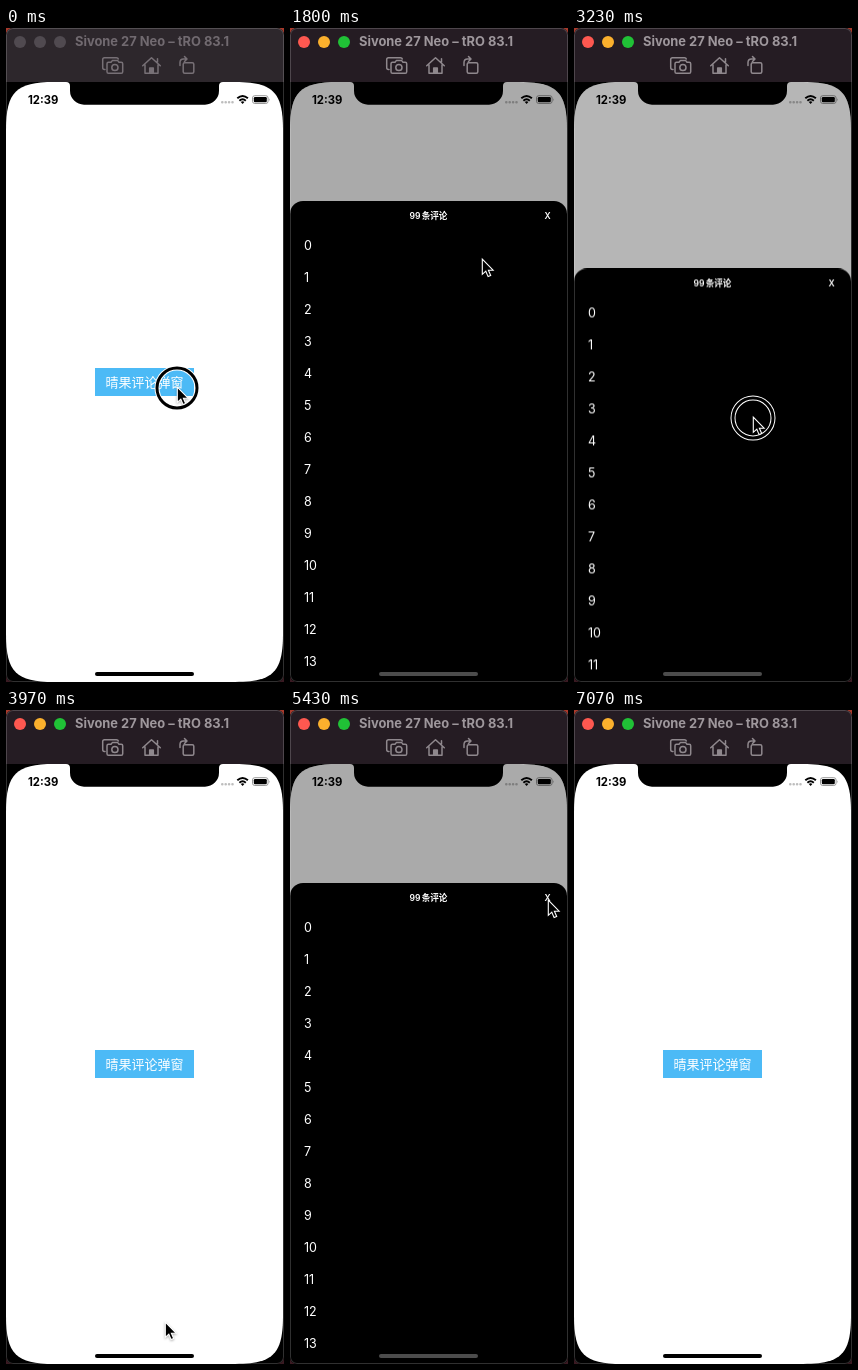
These frames come from a looping animation (278x654 px, 7230 ms). An HTML page:

```html
<!DOCTYPE html>
<html lang="zh-CN">
<head>
<meta charset="utf-8">
<title>评论弹窗</title>
<style>
:root { --loop: 7230ms; }
html, body { margin: 0; width: 100%; height: 100%; overflow: hidden; }
body {
  background: linear-gradient(#a83a2c, #3a1a22);
  font-family: Inter, "Noto Sans CJK SC", "Noto Sans CJK", sans-serif;
}
.stage { position: relative; width: 278px; height: 654px; overflow: hidden; background: #000; border-radius: 7px; }
.stage * { box-sizing: border-box; }
.stage div, .stage svg { position: absolute; }
.rim { inset: 0; border-radius: 7px; box-shadow: inset 0 0 0 1px rgba(255, 255, 255, .19); }

/* window bar */
.bar { left: 0; top: 0; width: 278px; height: 54px; animation: bar var(--loop) step-end infinite; }
.light { top: 8px; width: 12px; height: 12px; border-radius: 50%; animation: light var(--loop) step-end infinite; }
.name { left: 69px; top: 5px; font: 700 12.9px/17px Inter, sans-serif; white-space: nowrap; }
.icons { left: 0; top: 0; animation: icons var(--loop) step-end infinite; }
@keyframes bar {
  0% { color: #716a70; background: #2d272c; }
  .41%, 100% { color: #9e979c; background: #251c23; }
}
@keyframes light { 0% { background: #504a50; } .41%, 100% { background: var(--c); } }
@keyframes icons { 0% { color: #777076; } .41%, 100% { color: #8f888d; } }

/* phone screen, with continuous corners */
.screen {
  left: 0; top: 54px; width: 277px; height: 600px; background: #fff;
  clip-path: path("M0 48C0 10 10 0 48 0H229C267 0 277 10 277 48V552C277 590 267 600 229 600H48C10 600 0 590 0 552Z");
}
.button {
  left: 89px; top: 286px; width: 99px; height: 28px; background: #4cbaf6; color: #fff;
  font-size: 13px; line-height: 28px; text-align: center; white-space: nowrap;
}
.clock { left: 22px; top: 10px; font: 700 11.3px/16px Inter, sans-serif; color: #000; }
.dim { inset: 0; background: #000; animation: dim var(--loop) linear infinite; }

/* comment sheet */
.sheet {
  left: 0; top: 173px; width: 277px; height: 481px; background: #000; color: #fff;
  border-radius: 13px 13px 0 0; overflow: hidden;
  animation: sheet var(--loop) linear infinite;
}
.count, .close { top: 6.5px; font-size: 8.6px; font-weight: 600; line-height: 16px; }
.count { left: 0; width: 277px; text-align: center; word-spacing: -1px; }
.close { left: 254.5px; }
.view { left: 0; top: 28.6px; width: 277px; height: 453px; overflow: hidden; }
.list { left: 14px; top: 0; font-size: 12.5px; line-height: 32px; animation: list var(--loop) linear infinite; }
.list p { margin: 0; }
.home {
  left: 89px; top: 644px; width: 99px; height: 4px; border-radius: 2px;
  animation: home var(--loop) step-end infinite;
}

/* pointer */
.pointer { left: 0; top: 0; width: 0; height: 0; animation: move var(--loop) linear infinite; }
.pointer svg { left: -30px; top: -30px; }
.arrow { filter: drop-shadow(0 1px 1px rgba(0, 0, 0, .3)); }
.ring { animation: press var(--loop) step-end infinite; }

/* sheet eases out cubic; the dimming leads on opening and lags on closing */
@keyframes sheet {
  0% { transform: translateY(481px); }
  2.07% { transform: translateY(481px); animation-timing-function: cubic-bezier(.333, 1, .667, 1); }
  5.53%, 16.87% { transform: none; }
  19.64% { transform: translateY(45px); animation-timing-function: cubic-bezier(.333, 1, .667, 1); }
  22.13%, 40.94% { transform: none; }
  44.67%, 45.23% { transform: translateY(67.4px); }
  48.69% { transform: translateY(238px); animation-timing-function: cubic-bezier(.333, 1, .667, 1); }
  51.73% { transform: translateY(481px); }
  64.59% { transform: translateY(481px); animation-timing-function: cubic-bezier(.333, 1, .667, 1); }
  68.05% { transform: none; }
  79.63% { transform: none; animation-timing-function: cubic-bezier(.333, 1, .667, 1); }
  83.08%, 100% { transform: translateY(481px); }
}
@keyframes dim {
  0% { opacity: 0; }
  2.07% { opacity: 0; animation-timing-function: cubic-bezier(.165, .84, .44, 1); }
  5.53%, 16.87% { opacity: .333; }
  19.64% { opacity: .302; animation-timing-function: cubic-bezier(.333, 1, .667, 1); }
  22.13%, 40.94% { opacity: .333; }
  44.67%, 45.23% { opacity: .288; }
  48.69% { opacity: .168; animation-timing-function: cubic-bezier(.333, .667, .667, 1); }
  51.73% { opacity: 0; }
  64.59% { opacity: 0; animation-timing-function: cubic-bezier(.165, .84, .44, 1); }
  68.05% { opacity: .333; }
  79.63% { opacity: .333; animation-timing-function: cubic-bezier(.333, .667, .667, 1); }
  83.08%, 100% { opacity: 0; }
}
@keyframes list {
  0% { transform: none; }
  31.26% { transform: none; animation-timing-function: ease-in-out; }
  35.41% { transform: translateY(-90px); animation-timing-function: ease-in-out; }
  40.94%, 100% { transform: none; }
}
@keyframes home {
  0% { background: #000; }
  2.2% { background: #4c4c4c; }
  51.6% { background: #000; }
  64.7% { background: #4c4c4c; }
  83%, 100% { background: #000; }
}
@keyframes move {
  0% { transform: translate(171px, 359px); }
  13.42% { transform: translate(171px, 359px); animation-timing-function: ease-in-out; }
  16.6%, 16.87% { transform: translate(188px, 186px); }
  19.64% { transform: translate(192px, 231px); }
  25.86% { transform: translate(192px, 231px); animation-timing-function: ease-in-out; }
  30.43% { transform: translate(188px, 322px); }
  31.26% { transform: translate(188px, 322px); animation-timing-function: ease-in-out; }
  35.41% { transform: translate(186px, 232px); animation-timing-function: ease-in-out; }
  40.94% { transform: translate(182px, 322px); }
  44.67%, 45.23% { transform: translate(179px, 389px); }
  48.69% { transform: translate(162px, 560px); animation-timing-function: ease-out; }
  50.48% { transform: translate(159px, 612px); }
  55.33% { transform: translate(159px, 612px); animation-timing-function: ease-in-out; }
  62.24% { transform: translate(145px, 362px); }
  68.46% { transform: translate(145px, 362px); animation-timing-function: ease-in-out; }
  74.69% { transform: translate(258px, 190px); }
  81.6% { transform: translate(258px, 190px); animation-timing-function: ease-in-out; }
  86.72% { transform: translate(126px, 341px); visibility: visible; }
  96.54% { transform: translate(126px, 341px); visibility: visible; }
  97.64% { transform: translate(57px, 17px); visibility: visible; }
  97.65%, 100% { transform: translate(57px, 17px); visibility: hidden; }
}
@keyframes press {
  0% { opacity: 1; }
  1.4% { opacity: 0; }
  16.87% { opacity: 1; }
  19.64% { opacity: 0; }
  30.9% { opacity: 1; }
  48.69% { opacity: 0; }
  62.66% { opacity: 1; }
  64.18% { opacity: 0; }
  75.65% { opacity: 1; }
  77.03%, 100% { opacity: 0; }
}
</style>
</head>
<body>
<div class="stage">
  <div class="bar">
    <div class="light" style="left:8px;--c:#fe5850"></div>
    <div class="light" style="left:28px;--c:#fbb02d"></div>
    <div class="light" style="left:48px;--c:#20c136"></div>
    <div class="name">Sivone 27 Neo – tRO 83.1</div>
    <svg class="icons" width="278" height="54" fill="none" stroke="currentColor" stroke-width="1.5" stroke-linejoin="round" stroke-linecap="round">
      <path d="M99 41.5H98.5Q96.7 41.5 96.7 39.5V31.5Q96.7 29.7 98.5 29.7H110.5Q112 29.7 112.3 31"/>
      <path d="M102.5 34.2H105L106.3 32.6H111.7L113 34.2H115.2Q116.7 34.2 116.7 35.7V43.7Q116.7 45.3 115.2 45.3H102.5Q101 45.3 101 43.7V35.7Q101 34.2 102.5 34.2Z"/>
      <circle cx="108.9" cy="39.5" r="3.1"/>
      <path d="M136.7 37.7L145.5 29.7L154.3 37.7M139 36.5V45.3H152V36.5M151.5 34V30.7"/>
      <path d="M143.7 45V40H147.3V45Z" fill="currentColor"/>
      <rect x="177.2" y="34.7" width="10.6" height="10.6" rx="1.5"/>
      <path d="M174 37.5V34.5Q174 31 177.5 31H180.5M178.5 28.5L181 31L178.5 33.5"/>
    </svg>
  </div>

  <div class="screen">
    <div class="button">晴果评论弹窗</div>
    <div class="clock">12:39</div>
    <svg width="277" height="30">
      <path d="M60 0Q64 0 64 4V8.7A14 14 0 0 0 78 22.7H199A14 14 0 0 0 213 8.7V4Q213 0 217 0Z"/>
      <path d="M216.3 20.3H227" stroke="#bdbdbd" stroke-width="2.6" stroke-linecap="round" stroke-dasharray="0 3.4"/>
      <g fill="none" stroke="#000" stroke-width="1.9">
        <path d="M231.3 16.3Q236.6 11.5 241.9 16.3M233.4 18.7Q236.6 15.8 239.8 18.7"/>
      </g>
      <path d="M234.8 20Q236.6 18.7 238.4 20L236.6 22Z"/>
      <rect x="246.5" y="13.7" width="15.6" height="7.8" rx="2.3" fill="none" stroke="#999"/>
      <rect x="247.8" y="15" width="13" height="5.2" rx="1.2"/>
      <path d="M263.3 16.2Q264.7 17.6 263.3 19Z" fill="#999"/>
    </svg>
    <div class="dim"></div>
  </div>

  <div class="sheet">
    <div class="count">99 条评论</div>
    <div class="close">X</div>
    <div class="view"><div class="list"></div></div>
  </div>
  <div class="home"></div>
  <div class="rim"></div>

  <div class="pointer">
    <svg width="60" height="60" fill="none">
      <g class="ring">
        <circle cx="30" cy="31" r="20" stroke="#fff" stroke-width="5"/>
        <circle cx="30" cy="31" r="20" stroke="#000" stroke-width="3"/>
      </g>
      <path class="arrow" d="M30.3 30.2V45.3L33.8 42.2L36.1 47.6L38.7 46.5L36.4 41.2H41.1Z" fill="#000" stroke="#fff" stroke-width="1.1"/>
    </svg>
  </div>
</div>
<script>
const list = document.querySelector('.list');
for (let i = 0; i < 24; i++) {
  const row = document.createElement('p');
  row.textContent = i;
  list.append(row);
}
</script>
</body>
</html>
```
